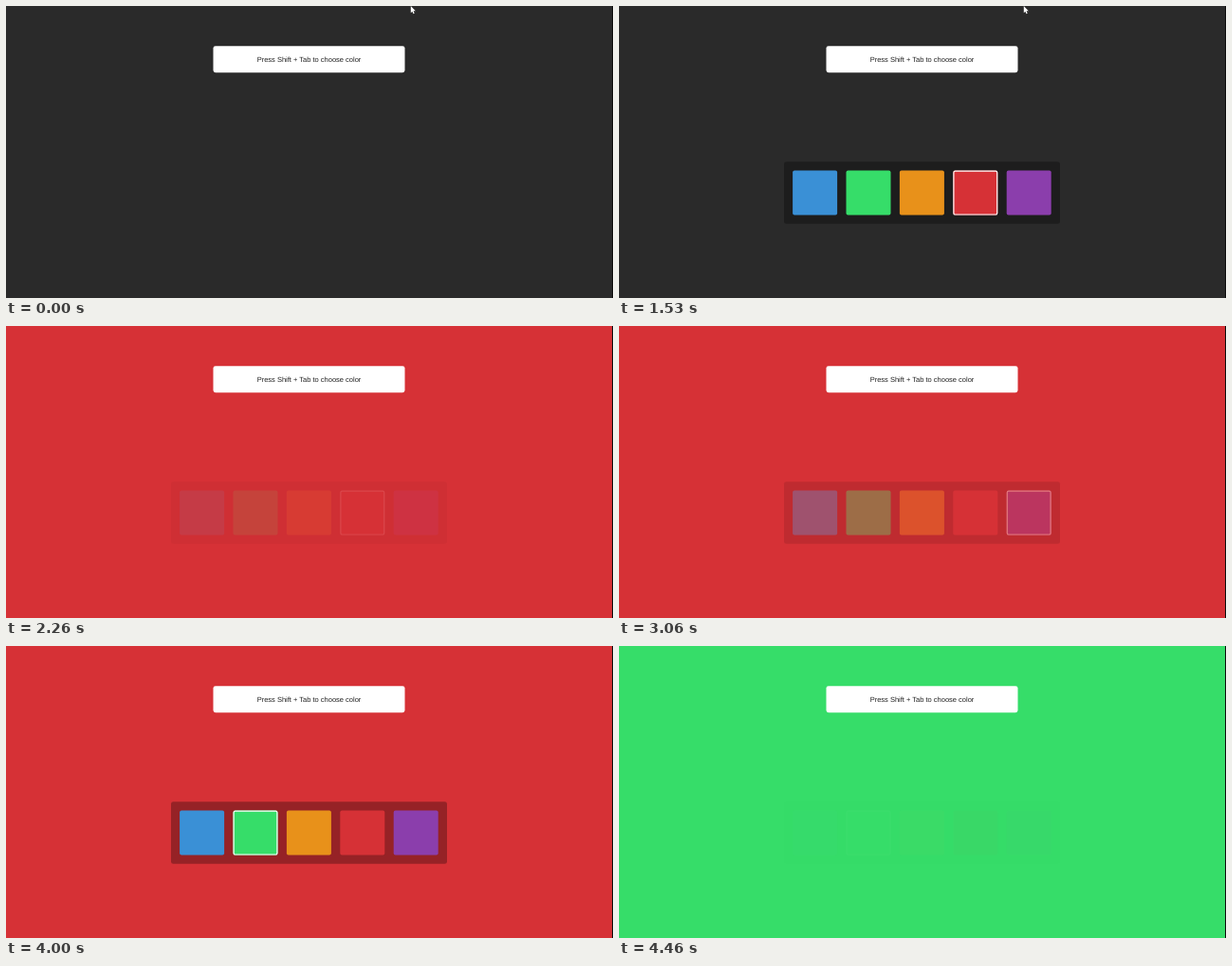
An HTML page for the animation above (4.6 s loop, 640x308 px).

```html
<!DOCTYPE html>
<html lang="en">
<head>
<meta charset="utf-8">
<title>Color chooser</title>
<style>
  html, body { margin: 0; width: 100%; height: 100%; overflow: hidden; background: #2a2a2a; }
  svg { display: block; width: 640px; height: 308px; }
  text { font: 7.5px Arial, "Liberation Sans", sans-serif; text-rendering: geometricPrecision; }
</style>
</head>
<body>
<svg viewBox="0 0 640 308">
  <rect id="back" width="640" height="308"/>
  <rect x="639" width="1" height="308" fill="#080808"/>
  <rect x="218.5" y="42.2" width="202" height="28" rx="2.4" fill="#fff"/>
  <text x="319.5" y="58.8" text-anchor="middle" fill="#222">Press Shift + Tab to choose color</text>
  <g id="panel">
    <rect x="174" y="164.2" width="291" height="65.6" rx="2.4" fill="#000" fill-opacity=".3"/>
  </g>
  <path id="cursor" fill="#fff" d="M426.8 0v7.2l1.6-1.5 1.1 2.5 1.2-.5-1.1-2.4h2.2z"/>
</svg>
<script>
const LOOP = 4600;
const COLORS = ["#3a90d6", "#36dd69", "#e8911a", "#d63136", "#8b3eac"];
const GREEN = 1, ORANGE = 2, RED = 3, PURPLE = 4, BLUE = 0;
const TICK = 66.7;

// When the panel opens or closes, and which swatch has the ring
const FADES = [
  { at: 530, open: true },
  { at: 2000, open: false },
  { at: 3060, open: true },
  { at: 4130, open: false }
];
const PICKS = [
  { at: 0, to: GREEN },
  { at: 1060, to: ORANGE },
  { at: 1400, to: RED },
  { at: 3060, to: PURPLE, instant: true },
  { at: 3330, to: BLUE },
  { at: 3860, to: GREEN }
];
const BACKS = [
  { at: 0, color: "#2a2a2a" },
  { at: 2000, color: COLORS[RED] },
  { at: 4130, color: COLORS[GREEN] }
];
const RISE = [0.35, 0.68, 0.89, 0.98, 1];
const FALL = [1, 0.63, 0.3, 0.1, 0.02];
const RING = [0.5, 0.9, 1];

const get = id => document.getElementById(id);
const back = get("back"), panel = get("panel"), cursor = get("cursor");

function addRect(attrs) {
  const rect = document.createElementNS("http://www.w3.org/2000/svg", "rect");
  for (const key in attrs) rect.setAttribute(key, attrs[key]);
  panel.append(rect);
  return rect;
}

const rings = COLORS.map((fill, i) => {
  const x = 183.1 + 56.4 * i, y = 173.6;
  addRect({ x, y, width: 47, height: 47, rx: 2, fill });
  return addRect({
    x: x + 0.6, y: y + 0.6, width: 45.8, height: 45.8, rx: 1.6,
    fill: "none", stroke: "#fff", "stroke-width": 1.2
  });
});

const lastIndex = (list, time) => list.findLastIndex(item => item.at <= time);

function stepped(values, elapsed) {
  const index = Math.floor((elapsed + 4) / TICK);
  return values[Math.min(index, values.length - 1)];
}

function draw(time) {
  back.setAttribute("fill", BACKS[lastIndex(BACKS, time)].color);
  cursor.style.opacity = time < 2000 ? 1 : 0;

  const fade = FADES[lastIndex(FADES, time)];
  panel.style.opacity = fade ? stepped(fade.open ? RISE : FALL, time - fade.at) : 0;

  const current = lastIndex(PICKS, time);
  const pick = PICKS[current], previous = PICKS[current - 1];
  const shown = !previous || pick.instant ? 1 : stepped(RING, time - pick.at);
  rings.forEach((ring, i) => {
    ring.style.opacity = i === pick.to ? shown
      : previous && i === previous.to ? 1 - shown : 0;
  });
}

const start = performance.now();
function frame() {
  draw((performance.now() - start) % LOOP);
  requestAnimationFrame(frame);
}
frame();
</script>
</body>
</html>
```
